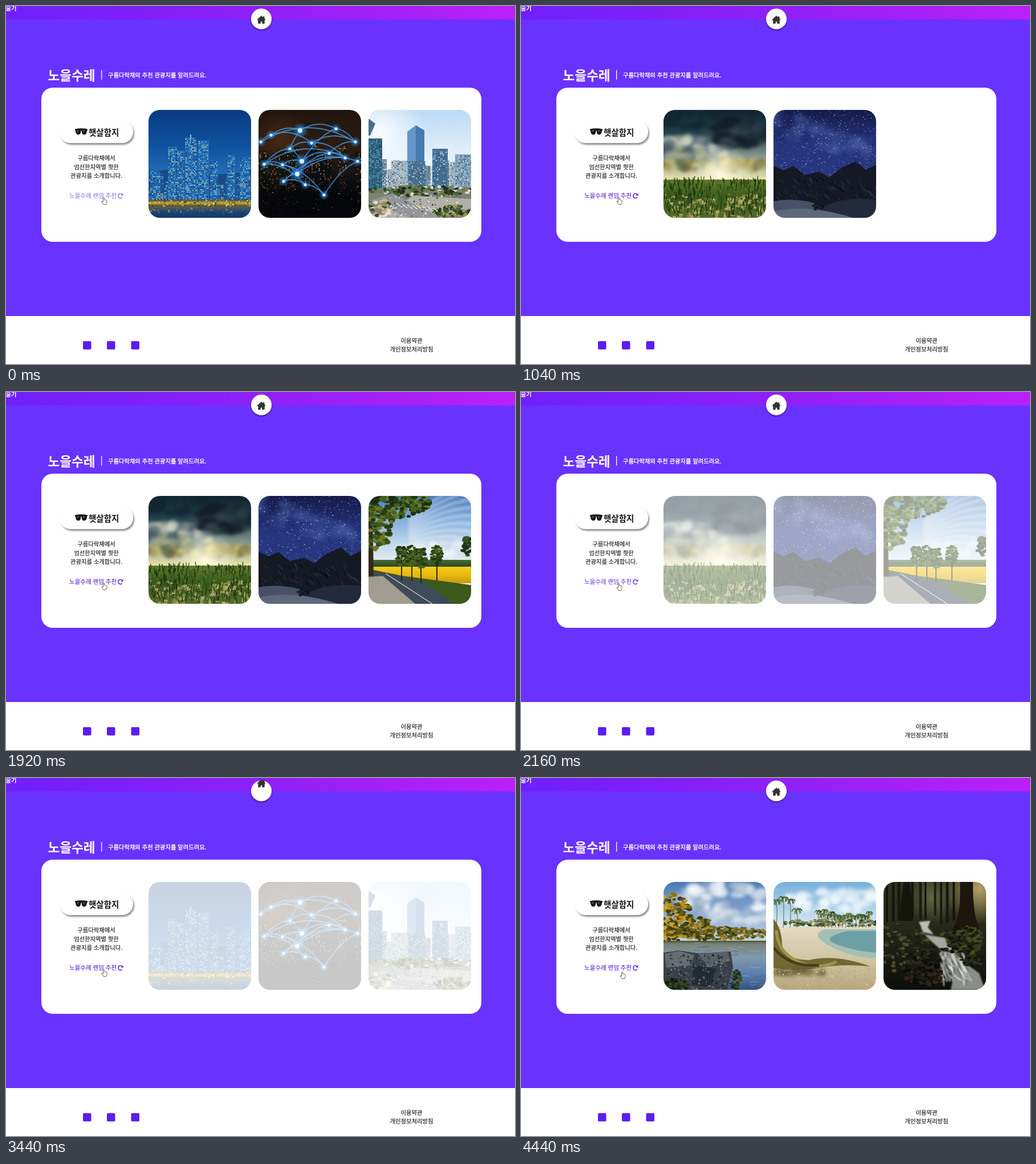
Animation of 893x627 px, one loop 4.48 s. Source, as an HTML page with a canvas:

```html
<!DOCTYPE html>
<html lang="ko">
<head>
<meta charset="utf-8">
<title>노을수레</title>
<style>
html, body { margin: 0; width: 100%; height: 100%; overflow: hidden; background: #6a32ff; }
svg, canvas { position: absolute; display: block; }
svg { left: 0; top: 0; }
text { font-family: "Noto Sans CJK KR", "Noto Sans CJK", "Noto Sans KR", sans-serif; font-size: 10.3px; }
.mid { text-anchor: middle; stroke: #222; stroke-width: .2; }
canvas { top: 182px; width: 180px; height: 189px; border-radius: 20px; }
.slot0 { left: 250px; }
.slot1 { left: 443px; }
.slot2 { left: 636px; }

.set, canvas, .link, .jump, .hand { animation: 4480ms linear infinite; }
#city { animation-name: city; }
#fields { animation-name: fields; }
#fields .slot0 { animation-name: pop640; }
#fields .slot1 { animation-name: pop1040; }
#fields .slot2 { animation-name: pop1120; }
#nature .slot0 { animation-name: pop3720; }
#nature .slot1 { animation-name: pop3880; }
#nature .slot2 { animation-name: pop4040; }
.link { fill: #5726d4; stroke: #5726d4; animation-name: press; }
.link text { stroke-width: .15; }
.jump { animation-name: jump; }
.hand { animation-name: hand; }

@keyframes city {
  0%, .893% { opacity: 1; }
  8.929%, 69.642% { opacity: 0; }
  69.643%, 70.536% { opacity: 1; }
  78.571%, 100% { opacity: 0; }
}
@keyframes fields {
  0%, 43.75% { opacity: 1; }
  51.786%, 100% { opacity: 0; }
}
@keyframes pop640 { 0%, 14.285% { opacity: 0; } 14.286%, 100% { opacity: 1; } }
@keyframes pop1040 { 0%, 23.213% { opacity: 0; } 23.214%, 100% { opacity: 1; } }
@keyframes pop1120 { 0%, 24.999% { opacity: 0; } 25%, 100% { opacity: 1; } }
@keyframes pop3720 { 0%, 83.035% { opacity: 0; } 83.036%, 100% { opacity: 1; } }
@keyframes pop3880 { 0%, 86.606% { opacity: 0; } 86.607%, 100% { opacity: 1; } }
@keyframes pop4040 { 0%, 90.178% { opacity: 0; } 90.179%, 100% { opacity: 1; } }
@keyframes press {
  0%, .893% { opacity: .62; }
  5.357%, 43.75% { opacity: 1; }
  45.536% { opacity: .62; }
  50%, 70.536% { opacity: 1; }
  72.321% { opacity: .62; }
  76.786%, 100% { opacity: 1; }
}
@keyframes jump {
  0%, 26.34% { transform: none; animation-timing-function: ease-in-out; }
  35.27% { transform: translateY(-15px); animation-timing-function: ease-in-out; }
  42.86%, 69.643% { transform: none; animation-timing-function: ease-in-out; }
  77.68% { transform: translateY(-15px); animation-timing-function: ease-in-out; }
  83.48% { transform: none; animation-timing-function: ease-in-out; }
  92.86% { transform: translateY(-15px); animation-timing-function: ease-in-out; }
  98.66%, 100% { transform: none; }
}
@keyframes hand {
  0%, 8% { transform: none; }
  9%, 13.4% { transform: translateY(-1px); }
  15%, 41% { transform: none; }
  42%, 46% { transform: translateY(-1px); }
  48%, 94.643% { transform: none; }
  98.214%, 100% { transform: translate(6px, 4px); }
}
</style>
</head>
<body>
<svg width="893" height="627" viewBox="0 0 893 627">
  <defs>
    <linearGradient id="strip">
      <stop offset="0" stop-color="#6f20fa"/>
      <stop offset=".5" stop-color="#8f20f6"/>
      <stop offset="1" stop-color="#bb20f8"/>
    </linearGradient>
    <filter id="soft" x="-20%" y="-30%" width="140%" height="170%">
      <feDropShadow dx="2" dy="3" stdDeviation="1.6" flood-color="#000" flood-opacity=".45"/>
    </filter>
    <filter id="low" x="-30%" y="-30%" width="160%" height="160%">
      <feDropShadow dx="0" dy="2" stdDeviation="1.5" flood-color="#000" flood-opacity=".45"/>
    </filter>
  </defs>
  <rect width="893" height="627" fill="#6a32ff"/>
  <rect width="893" height="23.5" fill="url(#strip)"/>
  <rect y="543" width="893" height="84" fill="#fff"/>
  <rect x="62" y="143" width="772" height="270" rx="20" fill="#fff"/>

  <g fill="#fff">
    <text x="-.5" y="8" style="font-weight:700">줄기</text>
    <text x="73.5" y="130" style="font-size:22.6px;font-weight:700">노을수레</text>
    <rect x="167" y="112" width="1.3" height="17"/>
    <text x="179" y="125" stroke="#fff" stroke-width=".3">구름다락채의 추천 관광지를 알려드려요.</text>
  </g>

  <circle cx="448" cy="22.5" r="18" fill="#fff" filter="url(#low)"/>
  <path class="jump" fill="#333" stroke="#333" stroke-linejoin="round" d="M448 17.5 440.800 24H442.800V30.500H446.200V27H449.800V30.500H453.200V24H455.200L453 22V18.800H451.300V20.300Z"/>

  <rect x="94" y="201" width="129" height="39" rx="19.5" fill="#fff" filter="url(#soft)"/>
  <g fill="#1d1815">
    <path d="M121 215.500Q132 213 143 215.500V217.500L142 218.500Q141.500 225.500 137 225.500 133 225.500 132.500 218.500H131.500Q131 225.500 127 225.500 122.500 225.500 122 218.500L121 217.500Z"/>
    <path d="M124.500 218Q126 217 128 218L125.500 221ZM135 218Q136.500 217 138.500 218L136 221Z" fill="#6e5f52"/>
  </g>
  <text x="145" y="226.5" fill="#181818" style="font-size:14.5px;font-weight:700">햇살함지</text>

  <g class="mid" fill="#222">
    <text x="158.5" y="270">구름다락채에서</text>
    <text x="158.5" y="285.5">엄선한지역별 핫한</text>
    <text x="158.5" y="301">관광지를 소개합니다.</text>
    <text x="711.5" y="589.5">이용약관</text>
    <text x="711.5" y="605">개인정보처리방침</text>
  </g>

  <g class="link">
    <text x="111" y="336" style="font-size:10.5px">노을수레 랜덤 추천</text>
    <path d="M203.800 335.200A4 4 0 1 1 203.800 329.800" fill="none" stroke-width="1.6"/>
    <path d="M205.500 327.800V332H201.300Z" stroke="none"/>
  </g>

  <g fill="#5d1cf2">
    <rect x="135" y="587" width="14.5" height="14.5" rx="2"/>
    <rect x="177" y="587" width="14.5" height="14.5" rx="2"/>
    <rect x="219.5" y="587" width="14.5" height="14.5" rx="2"/>
  </g>

  <path class="hand" fill="#fff" stroke="#555" stroke-width=".9" stroke-linejoin="round" d="M170.500 342V335.800Q171.500 334.300 172.500 335.800V339.300Q173.500 338.700 174.300 339.500 175.300 339.100 175.900 340 177 339.900 177.100 341V343.500L175.800 347.500H171.200L168 342.800Q168.200 341 170.500 343Z"/>
</svg>
<div class="set" id="city"></div>
<div class="set" id="fields"></div>
<div class="set" id="nature"></div>

<script>
const W = 180, H = 189;
let c, seed;

const rnd = (a = 0, b = 1) => {
  seed = (seed * 16807) % 2147483647;
  return a + (b - a) * seed / 2147483647;
};
const pick = list => list[Math.floor(rnd(0, list.length))];

const box = (x, y, w, h, col) => { c.fillStyle = col; c.fillRect(x, y, w, h); };

function fade(y, h, ...cols) {
  const g = c.createLinearGradient(0, y, 0, y + h);
  cols.forEach((col, i) => g.addColorStop(i / (cols.length - 1), col));
  box(0, y, W, h, g);
}

function glow(x, y, r, col) {
  const g = c.createRadialGradient(x, y, 0, x, y, r);
  g.addColorStop(0, col);
  g.addColorStop(1, col.slice(0, 7) + '00');
  box(x - r, y - r, 2 * r, 2 * r, g);
}

function shape(path, col) { c.fillStyle = col; c.fill(new Path2D(path)); }

function line(path, col, w) {
  c.strokeStyle = col;
  c.lineWidth = w;
  c.stroke(new Path2D(path));
}

function specks(n, x, y, w, h, size, cols) {
  while (n--) box(x + rnd(0, w), y + rnd(0, h), rnd(.5, size), rnd(.5, size), pick(cols));
}

// Cluster of ellipses inside a larger ellipse
function puff(n, x, y, rx, ry, size, cols) {
  while (n--) {
    const a = rnd(0, 6.283), d = Math.sqrt(rnd());
    c.fillStyle = pick(cols);
    c.beginPath();
    c.ellipse(x + rx * d * Math.cos(a), y + ry * d * Math.sin(a), rnd(.5, 1) * size, rnd(.3, .7) * size, 0, 0, 6.283);
    c.fill();
  }
}

function cloud(...args) {
  c.filter = 'blur(3px)';
  puff(...args);
  c.filter = 'none';
}

function tower(x, y, w, h, col, lights, density = .5) {
  box(x, y, w, h, col);
  for (let j = y + 2; j < y + h - 2; j += 3)
    for (let i = x + 1; i < x + w - 1; i += 2.5)
      if (rnd() < density) box(i, j, 1.7, 1.9, pick(lights));
}

function nightBay() {
  fade(0, H, '#083a80', '#0f529f', '#2a72ba', '#1c4d8c');
  shape('M0 112Q40 98 90 108T180 104V165H0Z', '#174a86');
  const lit = ['#2f8fd2', '#58b4e4', '#a4dcf0', '#d8cf78', '#0c3a74', '#164c88'];
  for (let x = 0; x < W; x += 9) tower(x, rnd(104, 132), 8.5, 60, '#1c5796', lit, .65);
  [[34, 64, 15], [50, 71, 13], [64, 48, 20], [87, 53, 19], [108, 88, 14], [138, 78, 14], [160, 82, 18], [5, 108, 16]]
    .forEach(([x, y, w]) => tower(x, y, w, 160 - y, '#2468ae', lit, .65));
  box(73, 43, 2, 8, '#78c8ec');
  fade(157, 12, '#3c4a34', '#c8a43c', '#46462c');
  specks(110, 0, 157, W, 11, 3, ['#f4dc68', '#ffe99a', '#2e4a30', '#1c3830']);
  fade(169, 20, '#5a6450', '#1c4274', '#12386c');
  specks(60, 0, 170, W, 10, 4, ['#8e8040', '#27507c']);
}

function network() {
  fade(0, H, '#20150e', '#2c1c12', '#121318', '#050608');
  glow(40, 50, 50, '#6a3a1470');
  const lit = ['#c08030', '#8e5a24', '#5a4630', '#e0b060'];
  for (let i = 0; i < 18; i++) tower(rnd(-5, 172), rnd(58, 112), rnd(9, 18), 90, pick(['#0c0f14', '#14140f', '#1a1613']), lit, .24);
  fade(105, 84, '#04060a00', '#04060ae8', '#04060af0');
  specks(35, 0, 125, W, 50, 2, lit);
  const at = [[4, 56], [22, 44], [73, 36], [136, 33], [170, 56], [93, 58], [55, 68], [76, 90], [124, 76],
    [152, 84], [10, 95], [42, 96], [68, 112], [44, 125], [82, 131], [115, 149], [174, 90]];
  const link = (a, b) => {
    const [x, y] = at[a], [u, v] = at[b];
    const arc = `M${x} ${y}Q${(x + u) / 2} ${(y + v) / 2 - Math.abs(u - x) * .3} ${u} ${v}`;
    line(arc, '#2372d050', 3);
    line(arc, '#5ab0f4', 1);
  };
  at.forEach((_, i) => { if (i) link(i - 1, i); if (i > 3) link(i - 4, i); });
  at.forEach(([x, y], i) => {
    const big = i % 5 === 2;
    glow(x, y, big ? 14 : 9, '#2f9cffe0');
    c.fillStyle = '#d8f2ff';
    c.beginPath();
    c.arc(x, y, big ? 4 : 2.6, 0, 6.283);
    c.fill();
  });
}

function dayTown() {
  fade(0, H, '#bcdaf4', '#dcecfa', '#f4f8fa', '#dce4e4');
  glow(20, 40, 80, '#ffffffe0');
  const glass = ['#a4c4dc', '#3f6c94', '#e0ecf2', '#28506e'];
  for (let x = 0; x < W; x += 11) tower(x, rnd(84, 108), 10, 60, pick(['#9db0bc', '#c6cdcd', '#7890a2']), glass, .5);
  shape('M68 128V38L83 27 98 36V128Z', '#6496c8');
  shape('M83 27 98 36V128H83Z', '#457aae');
  tower(112, 68, 27, 68, '#457092', glass, .4);
  tower(40, 89, 27, 48, '#a3b2ba', glass, .5);
  tower(70, 90, 30, 58, '#4c7290', glass, .45);
  tower(152, 78, 28, 75, '#7c9cb2', glass, .5);
  shape('M0 15 12 24 3 45H0Z', '#4c6e86');
  tower(0, 50, 24, 95, '#2d627e', ['#78a8be', '#1f465e', '#5a92ae'], .6);
  shape('M0 140 60 132 180 135V189H0Z', '#7c8272');
  puff(110, 90, 142, 92, 9, 5, ['#2f4828', '#49622f', '#6e7a42', '#222f22', '#d8dcd4']);
  shape('M22 189 78 150 180 156V172L128 189Z', '#b0b0aa');
  shape('M0 160 42 146 128 189H72Z', '#94969a');
  puff(60, 148, 178, 34, 10, 5, ['#2c4824', '#4a6230', '#9c9444', '#243020']);
  puff(60, 18, 172, 24, 15, 5, ['#c8b47c', '#8b8c72', '#3c4a34', '#e0dccc']);
  for (let i = 0; i < 8; i++) line(`M${50 + i * 9} ${164 + i}l9 7`, '#f4f4ea', 1.5);
  specks(130, 30, 148, 130, 38, 3, ['#f4f4ec', '#303838', '#d0b060', '#585c58']);
}

function meadow() {
  fade(0, 125, '#10222e', '#24434e', '#8c9c92', '#f0e8b0');
  cloud(45, 50, 68, 60, 17, 16, ['#dce0d0b0', '#6f8186a0', '#b9b790a0', '#3c525ca0']);
  cloud(55, 130, 42, 50, 22, 17, ['#121e26d0', '#20323ad0', '#34464ca0']);
  cloud(35, 35, 12, 55, 14, 18, ['#122632c0', '#1a343e']);
  cloud(60, 90, 97, 95, 10, 11, ['#a3924cb0', '#5e684eb0', '#e0d080b0']);
  glow(100, 114, 55, '#fffbdcff');
  fade(122, 67, '#647a2c', '#36561c', '#5a6a2c');
  specks(170, 0, 146, W, 43, 9, ['#a69c5c', '#b4a868', '#8d8c48']);
  for (let i = 0; i < 380; i++) {
    const x = rnd(0, W), y = rnd(126, 189);
    line(`M${x} ${y}l${rnd(-3, 3)} ${-rnd(4, 14)}`, pick(['#1c3c12', '#34581c', '#4c7424', '#182e10']), 1.4);
  }
}

function starry() {
  fade(0, H, '#141b48', '#26347e', '#2a3880', '#10172e');
  c.save();
  c.rotate(.35);
  cloud(60, 80, 12, 110, 20, 18, ['#5268b028', '#7084c828', '#4052a028']);
  c.restore();
  specks(620, 0, 0, W, 118, 1.5, ['#dce6ff', '#8ca4e8', '#5c78c8', '#101a44']);
  shape('M0 98 18 106 35 98 55 114 80 108 98 118 120 101 144 90 162 105 180 96V189H0Z', '#151924');
  for (let i = 0; i < 60; i++) {
    const x = rnd(0, W), y = rnd(116, 155);
    line(`M${x} ${y}l${rnd(3, 9)} ${rnd(4, 10)}`, pick(['#454d6090', '#343c5090', '#080b12']), 1.2);
  }
  shape('M0 160Q45 152 85 168T180 164V189H0Z', '#465066');
  shape('M85 170Q130 150 180 158V189H60Z', '#232a3c');
  shape('M0 178Q60 164 140 189H0Z', '#5e687c');
  puff(22, 78, 170, 9, 5, 4, ['#0e121a', '#1a202c']);
}

function road() {
  fade(0, 125, '#4a7cba', '#82aedc', '#c0d8ec', '#eef2f0');
  c.filter = 'blur(2px)';
  for (let i = 0; i < 9; i++) line(`M70 ${90 - i * 6}Q130 ${70 - i * 10} 190 ${95 - i * 15}`, '#ffffff60', 5);
  c.filter = 'none';
  cloud(30, 115, 92, 60, 12, 12, ['#ffffff80', '#d8e4f080']);
  fade(112, 14, '#4a6a38', '#28421e');
  fade(124, 29, '#f4cc20', '#e8b80c', '#c49a10');
  shape('M0 128 60 140 180 156V189H0Z', '#3c5a1c');
  shape('M0 134 28 134 95 150 150 189H0Z', '#3d4a58');
  shape('M0 142 25 140 82 189H0Z', '#a09c90');
  line('M30 136 112 189', '#d6d6d0', 1.3);
  [[58, 104], [76, 104], [92, 108], [120, 104]].forEach(([x, y]) => {
    box(x - 1, y, 2, 45, '#2c2414');
    puff(50, x, y, 10, 18, 4.5, ['#2f4818', '#486420', '#1f3414']);
  });
  shape('M0 20 7 24 9 140H0Z', '#33281a');
  puff(240, 30, 12, 78, 28, 7, ['#253c14', '#44601c', '#6a7c28', '#1a2c12']);
  puff(130, 14, 55, 28, 38, 6, ['#263c14', '#3e581c', '#6e7828']);
  puff(40, 174, 90, 9, 18, 5, ['#1e3418', '#3a5420']);
}

function lake() {
  fade(0, 105, '#4a78b4', '#86aad4', '#c4d4e4');
  cloud(70, 110, 30, 85, 28, 14, ['#f0f4f8c0', '#c0cede90', '#7894bc90', '#ffffffb0']);
  cloud(30, 130, 62, 60, 10, 12, ['#e4eaf0b0', '#a8bad0a0']);
  puff(200, 95, 90, 95, 11, 4.5, ['#7a6c20', '#57561c', '#a08828', '#34401c']);
  puff(260, 14, 62, 36, 42, 5.5, ['#8a7018', '#b4901c', '#5c5018', '#c8a42c', '#403c14']);
  puff(120, 60, 82, 32, 20, 5, ['#7c681c', '#a88c24', '#4c4818', '#383c18']);
  fade(103, 86, '#76806c', '#8098ac', '#5c80b0', '#34527e');
  fade(103, 8, '#4a4a2c', '#76806c00');
  for (let i = 0; i < 70; i++) line(`M${rnd(40, 175)} ${rnd(106, 185)}h${rnd(5, 20)}`, pick(['#a4bcd070', '#40608c80', '#86804060']), 1.2);
  shape('M0 124 28 120 60 125 118 122 122 150 112 189H0Z', '#3a4048');
  shape('M2 126 28 121 54 128 48 146 5 150Z', '#686c70');
  shape('M60 126 112 122 117 138 80 150Z', '#5a6068');
  shape('M52 145 92 152 82 185 50 180Z', '#222a32');
  specks(260, 4, 126, 108, 60, 4, ['#555c64', '#2a3038', '#747880', '#1c2228']);
  puff(80, 12, 180, 36, 11, 4, ['#1c2c14', '#34441c', '#101c12']);
  puff(45, 127, 172, 9, 18, 4, ['#1e3018', '#405020']);
}

function beach() {
  fade(0, 85, '#76b0dc', '#a8d0ea', '#e6f0f2');
  cloud(45, 110, 32, 85, 20, 14, ['#ffffff90', '#eef6faa0']);
  puff(130, 105, 72, 90, 7, 4, ['#3c5a30', '#7c8450', '#2a4428', '#a4a070']);
  fade(78, 111, '#e2dcc4', '#d0c6a4', '#b8a67c');
  shape('M180 83H90Q62 92 98 112T180 134Z', '#a4c0b4');
  shape('M180 86H130Q78 98 112 110T180 124Z', '#6ca0a4');
  for (let i = 0; i < 20; i++) {
    const near = i < 4;
    const x = near ? 5 + i * 12 : 54 + i * 6, y = near ? rnd(28, 50) : rnd(50, 64), r = near ? 9 : 6;
    line(`M${x} ${y}Q${x + 2} ${y + 15} ${x} 80`, '#746a50', 1.1);
    for (let a = 0; a < 9; a++)
      line(`M${x} ${y}q${r * .7 * Math.cos(a)} -4 ${r * Math.cos(a)} ${r * .6 * Math.sin(a) + 2}`, pick(['#314c28', '#506a30', '#6c7c44']), 1.5);
  }
  shape('M0 65Q14 80 15 108T62 137Q110 126 170 148 120 143 84 150 40 158 0 151Z', '#746832');
  line('M5 85Q6 120 40 138T110 140', '#a4934c', 5);
  line('M0 115Q28 150 80 146', '#453e1e', 5);
  cloud(20, 40, 158, 50, 5, 10, ['#6a5c3490']);
  specks(160, 0, 150, W, 39, 2.5, ['#a8966a', '#dccfa6', '#b6a470']);
}

function forest() {
  fade(0, H, '#30341e', '#2a2c1c', '#1b1c13', '#0d0f0c');
  glow(168, 12, 62, '#c4b070e0');
  glow(85, 28, 45, '#88906090');
  puff(110, 30, 112, 55, 45, 5, ['#3e4424', '#504c2c', '#191f10', '#2c2c1a']);
  for (let i = 0; i < 12; i++) {
    const x = i * 12 + rnd(0, 6);
    box(x, 0, rnd(3, 6), rnd(58, 78), pick(['#11140d', '#1c1b12', '#171810']));
  }
  shape('M136 0H157Q156 60 170 85H120Q135 65 136 0Z', '#1c160e');
  shape('M35 0H46L52 68H27Z', '#15150d');
  puff(150, 140, 103, 44, 24, 5, ['#343a18', '#1c2410', '#4a4a20', '#12160e']);
  puff(120, 80, 148, 45, 34, 6, ['#14150f', '#25251a', '#0c0e0b']);
  c.filter = 'blur(1px)';
  shape('M62 70 82 68 78 80 88 92 70 88Z', '#b8bcb4');
  shape('M72 92 108 98 112 112 132 122 100 118 84 104Z', '#a4a8a0');
  shape('M98 120 126 124 146 144 168 160 178 189H118L124 160 104 140Z', '#8a8e88');
  for (let i = 0; i < 60; i++) {
    const x = rnd(98, 142), y = rnd(120, 160);
    line(`M${x} ${y}q${rnd(-2, 7)} 8 ${rnd(2, 16)} ${rnd(14, 27)}`, pick(['#f8f9f4c0', '#d0d4cca0', '#3c403cc0']), 2);
  }
  c.filter = 'none';
  puff(26, 118, 112, 40, 12, 5, ['#11120e', '#22211a']);
  puff(60, 70, 162, 32, 22, 6, ['#0c0d0a', '#1c1a14', '#30241a']);
  puff(34, 155, 138, 22, 10, 5, ['#14170f', '#2c3018']);
}

const sets = {
  city: [nightBay, network, dayTown],
  fields: [meadow, starry, road],
  nature: [lake, beach, forest]
};
for (const [id, scenes] of Object.entries(sets)) {
  scenes.forEach((draw, i) => {
    const cv = document.createElement('canvas');
    cv.width = W;
    cv.height = H;
    cv.className = 'slot' + i;
    c = cv.getContext('2d');
    seed = 4021 + i * 977;
    draw();
    document.getElementById(id).append(cv);
  });
}
</script>
</body>
</html>
```
